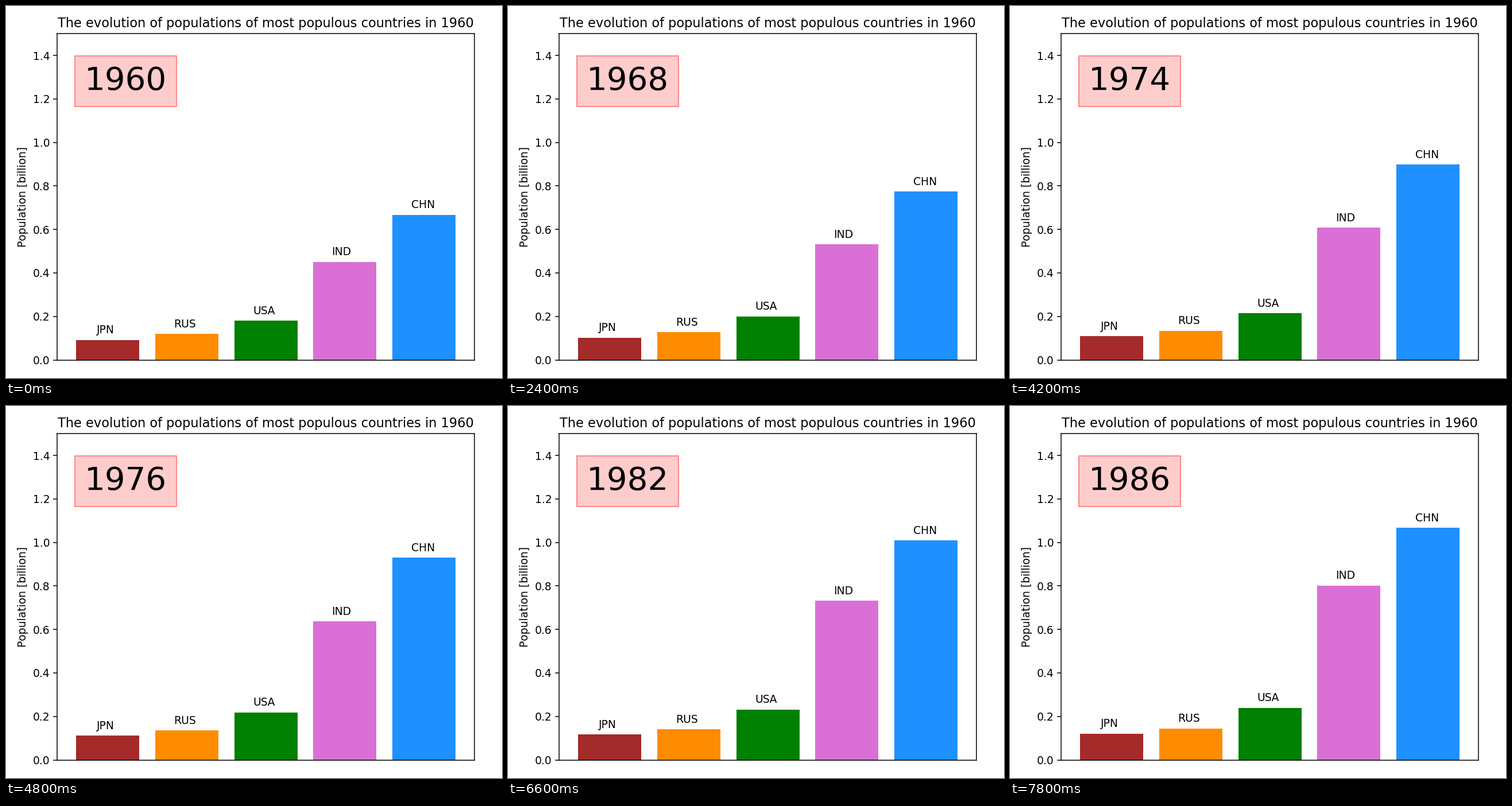
Recreate the animation shown at these times as a matplotlib script. Size 864 by 648 pixels, loop 8000 ms.

```python
import matplotlib.pyplot as plt
import numpy as np
from matplotlib.animation import FuncAnimation
from matplotlib.textpath import TextPath

plt.rcParams["font.family"] = "DejaVu Sans"
plt.rcParams["text.kerning_factor"] = 6

WIDTH, HEIGHT, DPI = 864, 648, 135
LEFT, RIGHT, BOTTOM, TOP = 89.49, 815.54, 31.4, 599.9
FIRST_YEAR = 1960
TICK_MS, TICKS_PER_YEAR, TICKS = 100, 3, 80
LABEL_SIZE, LABEL_DX, LABEL_DY = 10, -0.15, 0.03


def growth(start, rate, accel):
    """Population in millions, t years after the first year."""
    return lambda t: start + rate * t + accel * t ** 2


def dip_then_climb(t):
    """A short fall, a steep rise, then a slower one."""
    return np.interp(t, [0, 1, 2, 4, 8, 12, 15, 22, 26],
                     [667, 660, 666, 698, 774.5, 862, 916, 1008.6, 1066.8])


COUNTRIES = {
    "JPN": ("brown", growth(92.5, 1.377, -0.01)),
    "RUS": ("darkorange", growth(120.2, 1.01, -0.0022)),
    "USA": ("green", growth(180.9, 2.53, -0.0098)),
    "IND": ("orchid", growth(450.5, 8.68, 0.186)),
    "CHN": ("dodgerblue", dip_then_climb),
}


def populations(t):
    """Population of every country in billions."""
    return [model(t) / 1000 for _, model in COUNTRIES.values()]


def add_label(i, value, code):
    """Write a code whose first stroke, not its side bearing, starts at the anchor."""
    bearing = TextPath((0, 0), code, size=LABEL_SIZE).get_extents().x0
    return ax.annotate(code, (i + LABEL_DX, value + LABEL_DY), xytext=(-bearing, 0),
                       textcoords="offset points", size=LABEL_SIZE)


fig, ax = plt.subplots(figsize=(WIDTH / DPI, HEIGHT / DPI), dpi=DPI)
fig.subplots_adjust(left=LEFT / WIDTH, right=RIGHT / WIDTH,
                    bottom=BOTTOM / HEIGHT, top=TOP / HEIGHT)

start = populations(0)
bars = ax.bar(range(len(start)), start, color=[c for c, _ in COUNTRIES.values()])
labels = [add_label(i, value, code)
          for i, (code, value) in enumerate(zip(COUNTRIES, start))]
year_text = ax.text(-0.294, 1.21, str(FIRST_YEAR), size=30, va="bottom",
                    bbox=dict(boxstyle="square", ec=(1, 0.5, 0.5), fc=(1, 0.8, 0.8)))

ax.set_ylim(0, 1.5)
ax.set_xticks([])
ax.set_ylabel("Population [billion]")
ax.set_title(f"The evolution of populations of most populous countries in {FIRST_YEAR}")


def update(tick):
    t = tick // TICKS_PER_YEAR
    year_text.set_text(str(FIRST_YEAR + t))
    for i, (bar, label, value) in enumerate(zip(bars, labels, populations(t))):
        bar.set_height(value)
        label.xy = (i + LABEL_DX, value + LABEL_DY)
    return [*bars, *labels, year_text]


anim = FuncAnimation(fig, update, frames=TICKS, interval=TICK_MS, repeat=True)
plt.show()
```
